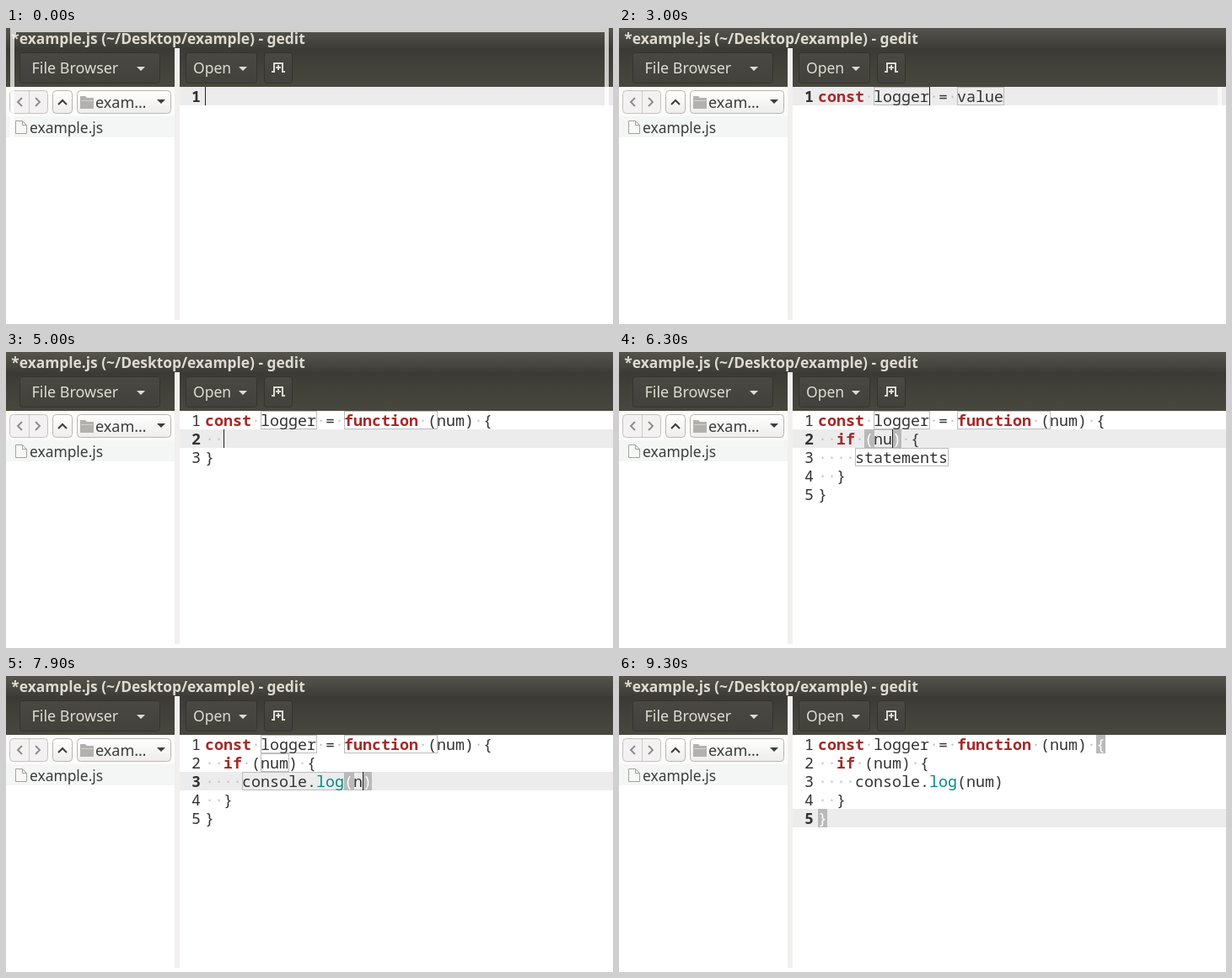
Write an HTML page that moves like this. It is 720 px wide and 352 px high and loops after 9.4 s.

```html
<!DOCTYPE html>
<html lang="en">
<head>
<meta charset="utf-8">
<title>Editor snippets</title>
<style>
  html, body { margin: 0; width: 100%; height: 100%; overflow: hidden; background: #fff; }
  svg { display: block; width: 720px; height: 352px; }
  text { font-family: "Noto Sans", "Open Sans", sans-serif; white-space: pre; }
  .light { fill: #dfdbd2; }
  .dark { fill: #3c3c3c; }
  .button { fill: url(#button); stroke: #34332f; }
  .pale { fill: url(#pale); stroke: #bab5b0; }
  .off { fill: #f3f1f2; stroke: #c6c1c0; }
  .line { fill: none; stroke-width: 2; }
  #code text { font-family: "Noto Sans Mono", "DejaVu Sans Mono", monospace; font-size: 18.333px; fill: #333; }
  #code .num { text-anchor: end; }
  #code .now, #code .key { font-weight: bold; }
  #code .key { fill: #a52a2a; }
  #code .call { fill: #008a8c; }
  #code .inv { fill: #fff; }
  #code .dot { fill: #c4c4c4; }
  .row { fill: #ececec; }
  .match { fill: #b9b9b9; }
  .sel { fill: #f07746; }
  .box { fill: none; stroke: #bdbdbd; }
  .caret { fill: #222; }
  .flash { fill: none; stroke: #fff; stroke-width: 5; opacity: .72; animation: flash 9.4s step-end infinite; }
  @keyframes flash { 0% { visibility: visible; } 1.0638%, 100% { visibility: hidden; } }
</style>
</head>
<body>
<svg viewBox="0 0 720 352">
  <defs>
    <linearGradient id="title" x2="0" y2="1"><stop stop-color="#55544d"/><stop offset="1" stop-color="#3d3c37"/></linearGradient>
    <linearGradient id="bar" x2="0" y2="1"><stop stop-color="#3b3a35"/><stop offset="1" stop-color="#49483f"/></linearGradient>
    <linearGradient id="button" x2="0" y2="1"><stop stop-color="#494842"/><stop offset="1" stop-color="#42413b"/></linearGradient>
    <linearGradient id="pale" x2="0" y2="1"><stop stop-color="#fff"/><stop offset="1" stop-color="#eeedec"/></linearGradient>
  </defs>

  <rect width="720" height="352" fill="#fff"/>
  <g id="code"></g>

  <!-- title and header bars -->
  <rect width="720" height="24" fill="url(#title)"/>
  <rect y="24" width="720" height="46" fill="url(#bar)"/>
  <text class="light" x="6.300" y="19" font-size="17.38" font-weight="bold">*example.js (~/Desktop/example) - gedit</text>
  <rect class="button" x="16.500" y="29.500" width="166" height="36" rx="3"/>
  <rect class="button" x="213.500" y="29.500" width="84" height="36" rx="3"/>
  <rect class="button" x="306.500" y="29.500" width="33" height="36" rx="3"/>
  <text class="light" x="30.500" y="54" font-size="17.950">File Browser</text>
  <text class="light" x="222" y="54" font-size="17.500">Open</text>
  <path class="light" d="M155 46h10l-5 5zM276 46h10l-5 5z"/>
  <path class="line" stroke="#dfdbd2" d="M315 52h3v-10h10v10h3M323 44v6M320 47h6"/>

  <!-- file pane -->
  <rect y="70" width="200" height="35" fill="#fbfbfa"/>
  <rect y="105" width="200" height="25" fill="#f4f6f5"/>
  <rect x="200" y="24" width="6" height="323" fill="#f1f0ee"/>
  <rect class="off" x="4.500" y="74.500" width="45" height="27" rx="4"/>
  <path stroke="#cfcbc7" d="M27.500 75v26"/>
  <path class="line" stroke="#8e8e8c" d="M19 83l-5 5 5 5M35 83l5 5-5 5"/>
  <rect class="pale" x="55.500" y="74.500" width="23" height="27" rx="4"/>
  <path class="line" stroke="#3c3c3c" d="M62 91l5-5 5 5"/>
  <rect class="pale" x="84.500" y="74.500" width="111" height="27" rx="4"/>
  <path fill="#b3b1ae" d="M88 81h6l2 2h8v13h-16z"/>
  <path stroke="#d5d3d0" d="M89 86.500h14"/>
  <text class="dark" x="106" y="95" font-size="18">exam…</text>
  <path class="dark" d="M179 85h10l-5 5z"/>
  <path fill="#f8f8f7" stroke="#a3a29f" d="M11.500 110.500h8l5 5v10h-13zM19.500 110.500v5h5"/>
  <text class="dark" x="28" y="125" font-size="17.400">example.js</text>

  <rect class="flash" x="7.500" y="2.500" width="705" height="347"/>
</svg>

<script>
const LOOP = 9400, X = 236, Y = 70, CW = 11, LH = 22;
const layer = document.getElementById('code');

// Markup: [field]  <selection>  | caret  ^ hidden caret
const states = [];
const show = (t, src) => states.push({ t, src });
const type = (t, before, word, after = '') => {
  for (let i = 1; i <= word.length; i++) {
    show(t + (i - 1) * 100, before + word.slice(0, i) + '|' + after);
  }
};

const head = 'const [logger] = ';
const fn = head + '[function (]';
const body = fn + 'num) {\n  ';
const cond = body + 'if (';
const loop = cond + '[num]) {\n    ';
const call = loop + '[console.log(]';
const done = (call + 'num)\n  }\n}').replace(/[[\]]/g, '');

show(0, '|');
type(1000, '', 'const');
show(1700, 'const [<name>] = [value]');
type(2300, 'const [', 'logger', '] = [value]');
show(3300, head + '[<value>]');
type(3500, head + '[', 'fun', ']');
show(3900, fn + '[<params>]) {\n  \n}');
type(4200, fn + '[', 'num', ']) {\n  \n}');
show(4600, body + '|\n}');
type(5200, body, 'if', '\n}');
show(5500, cond + '[<condition>]) {\n    [statements]\n  }\n}');
type(6200, cond + '[', 'num', ']) {\n    [statements]\n  }\n}');
show(6800, loop + '[<statements>]\n  }\n}');
type(7100, loop + '[', 'log', ']\n  }\n}');
show(7500, call + '[<obj>])\n  }\n}');
type(7900, call + '[', 'num', '])\n  }\n}');
show(8600, done + '|');
show(9300, done + '^');

function parse(src) {
  const lines = [''], boxes = [], sels = [];
  let caret, open, start, hidden = false;
  for (const c of src) {
    const row = lines.length - 1, col = lines[row].length;
    if (c === '\n') lines.push('');
    else if (c === '[') open = col;
    else if (c === ']') boxes.push([row, open, col - open]);
    else if (c === '<') start = col;
    else if (c === '>') { sels.push([row, start, col - start]); caret = [row, col]; hidden = true; }
    else if (c === '|' || c === '^') { caret = [row, col]; hidden = c === '^'; }
    else lines[row] += c;
  }
  return { lines, boxes, sels, caret, hidden };
}

// Bracket pair beside the caret, as [row, col, 1] cells
function pair(lines, [row, col]) {
  const at = [col, col - 1].find(i => '(){}'.includes(lines[row][i] || ' '));
  if (at === undefined) return [];
  const cells = lines.flatMap((s, r) => [...s].map((ch, c) => ({ ch, r, c })));
  let i = cells.findIndex(p => p.r === row && p.c === at);
  const me = cells[i].ch, mate = { '(': ')', ')': '(', '{': '}', '}': '{' }[me];
  const step = '({'.includes(me) ? 1 : -1;
  for (let depth = 0; cells[i]; i += step) {
    if (cells[i].ch === me) depth++;
    if (cells[i].ch === mate && --depth === 0) return [[row, at, 1], [cells[i].r, cells[i].c, 1]];
  }
  return [];
}

const rect = (cls, x, y, w, h) => `<rect class="${cls}" x="${x}" y="${y}" width="${w}" height="${h}"/>`;
const label = (cls, x, row, s) => `<text class="${cls}" x="${x}" y="${Y + row * LH + 18}">${s}</text>`;
const cell = cls => ([r, c, n]) => rect(cls, X + c * CW, Y + r * LH, n * CW, LH);
const frame = ([r, c, n]) => rect('box', X + c * CW + .5, Y + r * LH + .5, n * CW, LH - 1);

function tokenClass(s) {
  if (/^(const|function|if)$/.test(s)) return 'key';
  return s === ' ' ? 'dot' : '';
}

function draw({ t, src }) {
  const { lines, boxes, sels, caret, hidden } = parse(src);
  const marks = sels.length ? [] : pair(lines, caret);
  const lit = [...marks, ...sels];
  let out = rect('row', 206, Y + caret[0] * LH, 514, LH);
  if (t < 3700) out += '<rect x="710" y="70" width="5" height="22" fill="#f8f8f8"/>';
  out += marks.map(cell('match')).join('') + sels.map(cell('sel')).join('') + boxes.map(frame).join('');
  lines.forEach((line, r) => {
    out += label(r === caret[0] ? 'num now' : 'num', 231, r, r + 1);
    for (const m of line.matchAll(/\w+|\W/g)) {
      const s = m[0], c = m.index;
      let cls = tokenClass(s);
      if (s === 'log' && line[c - 1] === '.') cls = 'call';
      if (lit.some(([lr, lc, n]) => lr === r && c >= lc && c < lc + n)) cls = 'inv';
      out += label(cls, X + c * CW, r, s === ' ' ? '·' : s);
    }
  });
  if (!hidden) out += rect('caret', X + caret[1] * CW, Y + caret[0] * LH, 1, LH);
  layer.innerHTML = out;
}

let current;
function tick(now) {
  const t = now % LOOP;
  const next = states.findLast(s => s.t <= t) || states[0];
  if (next !== current) draw(current = next);
  requestAnimationFrame(tick);
}
tick(performance.now());
</script>
</body>
</html>
```
